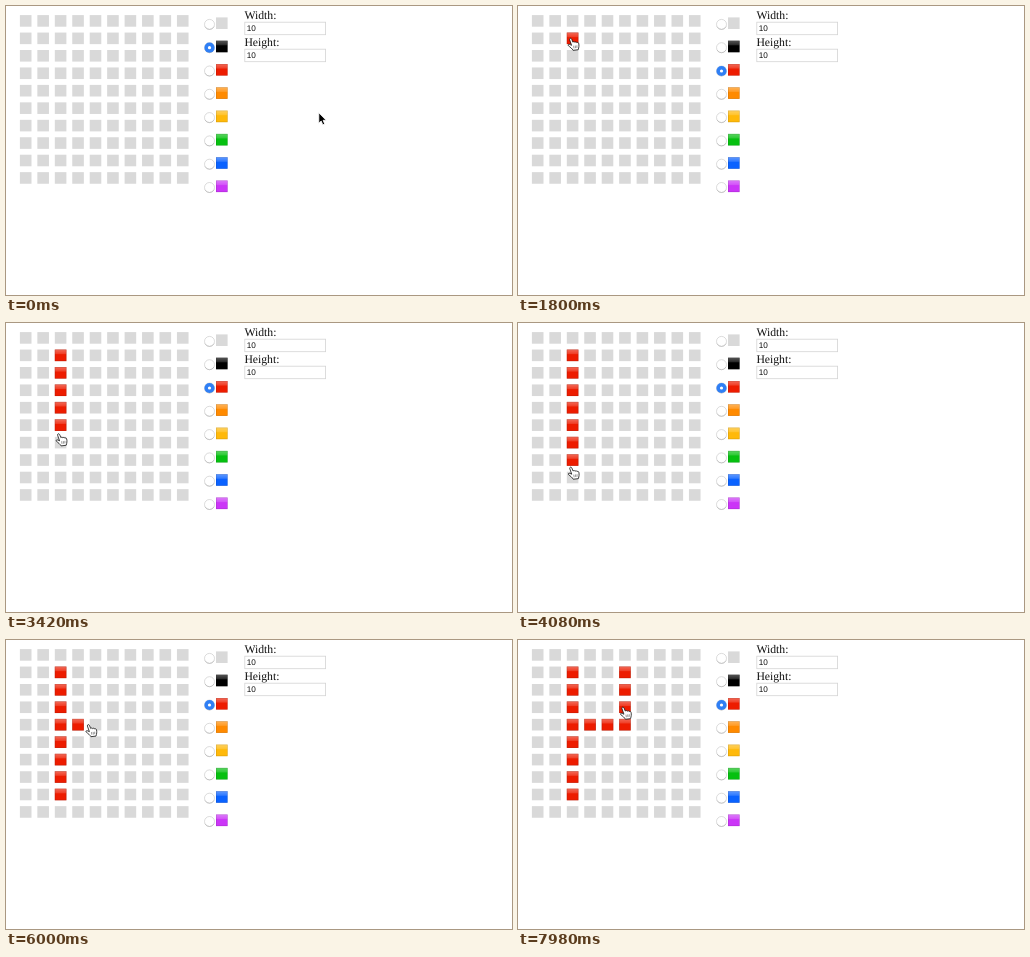
An HTML page for the animation above (8000 ms loop, 506x289 px).

```html
<!DOCTYPE html>
<html lang="en">
<head>
<meta charset="utf-8">
<title>Pixel painter</title>
<style>
  html, body { margin: 0; width: 100%; height: 100%; overflow: hidden; background: #fff; }
  svg { display: block; width: 100%; height: 100%; text-rendering: geometricPrecision; }
  .label { font: 11.7px "Liberation Serif", Times, serif; fill: #111; }
  .value { font: 8.2px "Liberation Sans", Arial, sans-serif; fill: #111; }
</style>
</head>
<body>
<svg id="stage" viewBox="0 0 506 289">
  <defs>
    <linearGradient id="gloss" x2="0" y2="1">
      <stop offset="0" stop-color="#fff" stop-opacity=".34"/>
      <stop offset="1" stop-color="#fff" stop-opacity=".14"/>
    </linearGradient>
  </defs>
</svg>
<script>
const LOOP = 8000, STEP = 60;
const SIZE = 11.6, PITCH = 17.45, LEFT = 13.9, TOP = 9.1;
const BLACK = 1, RED = 2, PICK_TIME = 720;
const COLORS = ['#d9d9d9', '#000', '#ed1c00', '#ff8a00', '#ffb90a', '#06c010', '#0a62ff', '#cb35f7'];

const stage = document.getElementById('stage');

function add(tag, attrs, parent = stage) {
  const el = document.createElementNS('http://www.w3.org/2000/svg', tag);
  for (const key in attrs) el.setAttribute(key, attrs[key]);
  return parent.appendChild(el);
}

const show = (el, on) => el.setAttribute('visibility', on ? 'visible' : 'hidden');
const cellX = col => LEFT + col * PITCH;
const cellY = row => TOP + row * PITCH;

function tile(x, y, color) {
  const g = add('g', { transform: `translate(${x} ${y})` });
  add('rect', { width: SIZE, height: SIZE, fill: COLORS[color] }, g);
  if (color) {
    add('rect', { width: SIZE, height: 4.6, fill: 'url(#gloss)' }, g);
    add('rect', {
      x: 0.3, y: 0.3, width: SIZE - 0.6, height: SIZE - 0.6,
      fill: 'none', stroke: '#000', 'stroke-width': 0.6, 'stroke-opacity': 0.15
    }, g);
  }
  return g;
}

function radio(y) {
  const at = { cx: 203.5, cy: y };
  add('circle', { ...at, r: 5, fill: '#fff', stroke: '#c4c4c4', 'stroke-width': 0.6 });
  add('path', { d: `M199 ${y + 2.2}a5 5 0 0 0 9 0`, fill: 'none', stroke: '#a8a8a8', 'stroke-width': 0.5 });
  const on = add('g', {});
  add('circle', { ...at, r: 5.1, fill: '#2f7ff5' }, on);
  add('circle', { ...at, r: 1.6, fill: '#fff' }, on);
  return on;
}

function field(label, y) {
  add('text', { class: 'label', x: 238.4, y: y + 13 }).textContent = label;
  add('rect', { x: 238.8, y: y + 16.2, width: 80.8, height: 12.5, fill: '#fff', stroke: '#d4d4d4', 'stroke-width': 0.8 });
  add('text', { class: 'value', x: 240.8, y: y + 25.4 }).textContent = '10';
}

// The pointer rests around each click and eases between rests.
const clicks = [], keys = [];

const move = (time, x, y) => keys.push({ time, x, y });

function paintRun(col, row, dc, dr, count, time, gap) {
  for (let i = 0; i < count; i++) {
    const c = col + dc * i, r = row + dr * i, t = time + gap * i;
    clicks.push({ col: c, row: r, time: t });
    for (const rest of [-gap / 4, gap / 4]) move(t + rest, cellX(c) + 0.6, cellY(r) + 5);
  }
}

move(60, 312, 106);
move(240, 220, 67);
move(480, 220, 67);
move(PICK_TIME, 212, 60);
move(1080, 75.5, 54.5);
paintRun(2, 1, 0, 1, 7, 1800, 360);
move(4140, 50, 164);
paintRun(2, 8, 0, 0, 1, 4800, 360);
move(5400, 74, 68);
paintRun(3, 4, 1, 0, 3, 5760, 420);
move(6780, 103, 59);
move(7020, 102.3, 55);
paintRun(5, 1, 0, 1, 3, 7620, 180);

for (let i = 0; i < 100; i++) tile(cellX(i % 10), cellY(Math.floor(i / 10)), 0);
for (const click of clicks) click.el = tile(cellX(click.col), cellY(click.row), RED);
const radios = COLORS.map((_, i) => {
  tile(210, 11.4 + i * 23.3, i);
  return radio(18.4 + i * 23.3);
});
field('Width:', 0);
field('Height:', 27);

const arrow = add('path', {
  d: 'M.8 .8V11.2L3.2 9 4.8 12.8 6.7 12 5.1 8.3H8.2Z',
  fill: '#000', stroke: '#fff', 'stroke-width': 0.8
});
const hand = add('g', {});
add('path', {
  d: 'M4.2 7.8 2.2 2.2C1.8 .6 3.7 .1 4.3 1.6L5.5 4.6C6.1 3.8 7.2 4 7.5 4.8 8.2 4 9.2 4.3 9.5 5.1 10.3 4.6 11.1 5 11.3 5.9 11.8 8 11.5 9.8 10.8 12.2L5.7 12.8C4.7 11 2.8 9.6 1.1 8.3 .2 7.4 1.2 6.4 2.4 6.9Z',
  fill: '#fff', stroke: '#111', 'stroke-width': 0.8, 'stroke-linejoin': 'round'
}, hand);
add('path', { d: 'M6.2 8.2 6.6 10.8M7.9 8 8.2 10.6M9.5 7.8V10.3', stroke: '#333', 'stroke-width': 0.5 }, hand);

function pointerAt(t) {
  const i = keys.findIndex(key => key.time >= t);
  if (i <= 0) return keys[0];
  const a = keys[i - 1], b = keys[i];
  const k = (t - a.time) / (b.time - a.time);
  const ease = k * k * (3 - 2 * k);
  return { x: a.x + (b.x - a.x) * ease, y: a.y + (b.y - a.y) * ease };
}

function render(ms) {
  const t = Math.floor((ms % LOOP) / STEP) * STEP;
  const { x, y } = pointerAt(t);
  const picked = t < PICK_TIME ? BLACK : RED;
  radios.forEach((el, i) => show(el, i === picked));
  for (const { el, time } of clicks) show(el, t >= time);
  const overGrid = x < 190;
  show(arrow, !overGrid);
  show(hand, overGrid);
  for (const el of [arrow, hand]) el.setAttribute('transform', `translate(${x} ${y})`);
}

const start = performance.now();
function tick() {
  render(performance.now() - start);
  requestAnimationFrame(tick);
}
tick();
</script>
</body>
</html>
```
